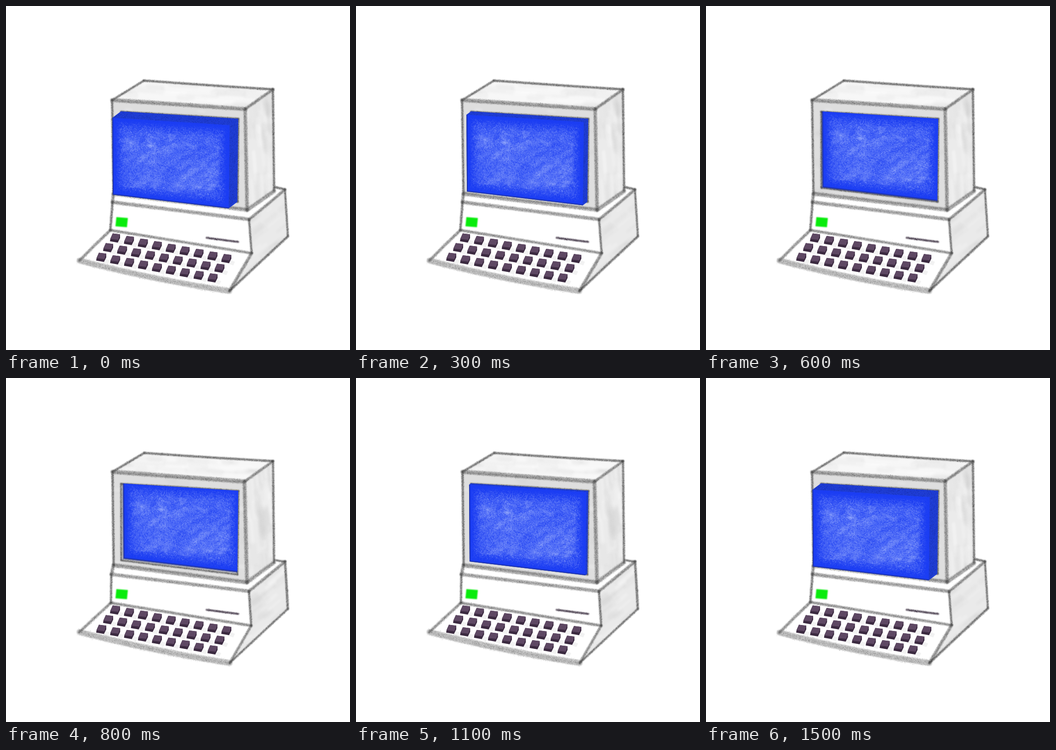
An HTML page with a canvas for the animation above (1.6 s loop, 748 px wide and 748 px high).

```html
<!DOCTYPE html>
<html lang="en">
<head>
<meta charset="utf-8">
<title>Crayon computer</title>
<style>
  html, body { margin: 0; width: 100%; height: 100%; overflow: hidden; background: #fff; }
  canvas { display: block; }
</style>
</head>
<body>
<canvas id="stage" width="748" height="748"></canvas>
<script>
const SIZE = 748, STEP = 100, STEPS = 16, POSES = 3;
const BLUE = '#1b3df3', SIDE_BLUE = '#1d3bd2';
const stage = document.getElementById('stage').getContext('2d');

// Corners: monitor a-g, base h-p, screen opening q-t
const CORNERS = {
  a: [300, 163], b: [580, 181], c: [230, 204], d: [520, 224],
  e: [234, 408], f: [523, 444], g: [582, 402],
  h: [230, 427], i: [528, 465], j: [607, 398], k: [612, 502], p: [585, 395],
  l: [227, 488], m: [533, 538], n: [160, 554], o: [486, 620],
  q: [250, 229], r: [505, 245], s: [503, 426], t: [251, 396]
};
const corners = (names, from = CORNERS) => [...names].map(name => from[name]);
const OPENING = corners('qrst');

let seed = 7;
const random = () => (seed = seed * 16807 % 2147483647) / 2147483647;
const spread = () => random() + random() - 1;

function layer() {
  const c = document.createElement('canvas');
  c.width = c.height = SIZE;
  return c.getContext('2d');
}

function trace(g, points) {
  g.beginPath();
  points.forEach(([x, y]) => g.lineTo(x, y));
  g.closePath();
}

function fill(g, points, color) {
  trace(g, points);
  g.fillStyle = color;
  g.fill();
}

// Grainy stroke, sagging by `bow` pixels in the middle
function pencil(g, a, b, width, dark, bow = 0, color = '65,65,65') {
  const m = [(a[0] + b[0]) / 2, (a[1] + b[1]) / 2 + bow * 2];
  g.save();
  g.filter = 'blur(1px)';
  g.lineCap = 'round';
  g.lineWidth = width;
  g.strokeStyle = `rgba(${color},${dark * 0.7})`;
  g.beginPath();
  g.moveTo(...a);
  g.quadraticCurveTo(...m, ...b);
  g.stroke();
  g.restore();
  const dots = Math.hypot(b[0] - a[0], b[1] - a[1]) * width * 0.55;
  g.fillStyle = `rgba(${color},${dark * 0.35})`;
  for (let i = 0; i < dots; i++) {
    const t = random(), u = 1 - t;
    const at = k => u * u * a[k] + 2 * u * t * m[k] + t * t * b[k] + spread() * width * 0.75;
    g.fillRect(at(0) - 0.5, at(1) - 0.5, 1.2, 1.2);
  }
}

// Soft random strokes inside a polygon, within the middle `part` of its height
function scribble(g, shape, color, count, width, [dx, dy], [from, to] = [0, 1]) {
  const xs = shape.map(p => p[0]), ys = shape.map(p => p[1]);
  const left = Math.min(...xs), top = Math.min(...ys);
  const w = Math.max(...xs) - left, h = Math.max(...ys) - top;
  g.save();
  trace(g, shape);
  g.clip();
  g.filter = 'blur(2px)';
  g.strokeStyle = color;
  g.lineCap = 'round';
  for (let i = 0; i < count; i++) {
    const x = left + random() * w, y = top + h * (from + random() * (to - from));
    const k = (0.3 + random()) / 2;
    g.lineWidth = width * (0.5 + random());
    g.beginPath();
    g.moveTo(x - dx * k, y - dy * k);
    g.lineTo(x + dx * k, y + dy * k);
    g.stroke();
  }
  g.restore();
}

function drawKey(g, x, y) {
  const at = points => points.map(([px, py]) => [x + px, y + py]);
  fill(g, at([[9, 4], [19, 8], [15, 16], [2, 11]]), 'rgba(0,0,0,.05)');
  fill(g, at([[-5, -9], [11, -7], [11, 1], [6, 11], [-11, 8], [-10, 2]]), '#3b2a40');
  fill(g, at([[-5, -9], [11, -7], [7, 5], [-10, 3]]), '#5e4863');
}

function drawComputer() {
  const g = layer();
  const shaky = {};
  for (const name in CORNERS) shaky[name] = CORNERS[name].map(v => v + spread() * 1.8);

  const shade = (names, color, direction) => {
    const face = corners(names, shaky);
    fill(g, face, color);
    scribble(g, face, 'rgba(190,190,190,.1)', 35, 10, direction);
    scribble(g, face, 'rgba(255,255,255,.2)', 20, 7, direction);
  };
  const sketch = (edges, width, dark, bow = 0) => {
    for (const edge of edges.split(' '))
      pencil(g, ...corners(edge, shaky), width * (1 + spread() * 0.15), dark, bow + spread());
  };

  shade('acdb', '#f7f7f7', [60, 4]);
  shade('dbgf', '#ebebeb', [4, 50]);
  shade('cdfe', '#dedede', [30, 2]);
  shade('ijkom', '#eaeaea', [30, -25]);
  sketch('ab ac bg ce pj jk ko im hl', 4.5, 0.8);
  sketch('db nl lm ij mo eh', 6, 0.62);
  sketch('cd df ef fg hi', 8, 0.55);
  sketch('no', 12, 0.42, 4);
  sketch('qr rs st tq', 4, 0.8);

  pencil(g, [436, 504], [505, 513], 4, 1, 0, '45,32,50');
  g.filter = 'blur(0.5px)';
  for (let row = 0; row < 3; row++)
    for (let col = 0; col < 9; col++)
      drawKey(g, 237 + 30.25 * col - 15 * row, 503.5 + 5.6 * col + 21 * row);
  return g.canvas;
}

function speckle(g, colors, count) {
  for (let i = 0; i < count; i++) {
    g.fillStyle = colors[i % colors.length];
    g.fillRect(225 + random() * 285, 225 + random() * 220, 1.2, 1.2);
  }
}

function drawScreenFace() {
  const g = layer();
  const inset = OPENING.map(([x, y]) => [377 + (x - 377) * 0.84, 324 + (y - 324) * 0.76]);
  fill(g, OPENING, BLUE);
  trace(g, OPENING);
  g.clip();
  g.filter = 'blur(9px)';
  fill(g, inset, 'rgba(125,150,252,.42)');
  g.filter = 'none';
  scribble(g, inset, 'rgba(165,185,255,.16)', 70, 9, [26, -16], [0.25, 0.85]);
  scribble(g, inset, 'rgba(190,205,255,.3)', 22, 6, [12, 5], [0.05, 0.3]);
  scribble(g, inset, 'rgba(190,205,255,.3)', 22, 5, [14, 3], [0.75, 1]);
  scribble(g, inset, 'rgba(27,61,243,.3)', 35, 6, [16, -6]);
  speckle(g, ['rgba(27,58,240,.4)', 'rgba(185,200,255,.26)'], 42000);
  g.filter = 'blur(4px)';
  g.strokeStyle = BLUE;
  g.lineWidth = 20;
  trace(g, OPENING);
  g.stroke();
  return g.canvas;
}

function drawScreenSides() {
  const g = layer();
  g.fillStyle = SIDE_BLUE;
  g.fillRect(0, 0, SIZE, SIZE);
  speckle(g, ['rgba(20,35,120,.3)', 'rgba(70,100,240,.25)'], 12000);
  return g.canvas;
}

const computers = Array.from({ length: POSES }, drawComputer);
const face = drawScreenFace();
const sides = drawScreenSides();

// Negative depth slides the screen out of its frame, positive pushes it in
function drawScreen(depth) {
  const dy = -0.75 * depth;
  const [topLeft, topRight, bottomRight] = OPENING;
  const [frontTopLeft, , frontBottomRight, frontBottomLeft] = OPENING.map(([x, y]) => [x + depth, y + dy]);
  const slab = [topLeft, topRight, bottomRight, frontBottomRight, frontBottomLeft, frontTopLeft];
  stage.save();
  trace(stage, depth > 0 ? OPENING : slab);
  stage.clip();
  if (depth < 0) stage.drawImage(sides, 0, 0);
  stage.drawImage(face, depth, dy);
  stage.strokeStyle = 'rgba(30,40,110,.5)';
  stage.lineWidth = 4;
  stage.beginPath();
  stage.moveTo(...frontTopLeft);
  stage.lineTo(...frontBottomLeft);
  stage.lineTo(...frontBottomRight);
  stage.stroke();
  stage.restore();
}

function drawLight(glow) {
  stage.save();
  stage.filter = `blur(${0.8 + glow}px)`;
  stage.globalAlpha = glow;
  fill(stage, [[240, 457], [263, 457], [271, 475], [267, 483], [240, 479], [237, 468]], '#c8fa50');
  stage.globalAlpha = 1;
  const inset = glow * 2.5;
  fill(stage, [[240 + inset, 459 + inset], [265 - inset, 461 + inset],
    [263 - inset, 481 - inset], [238 + inset, 479 - inset]], '#08ec0c');
  stage.restore();
}

function render(time) {
  const step = Math.floor(time / STEP) % STEPS;
  const angle = step / STEPS * 2 * Math.PI + 0.15;
  stage.fillStyle = '#fff';
  stage.fillRect(0, 0, SIZE, SIZE);
  stage.drawImage(computers[step % POSES], 0, 0);
  drawScreen(-7 - 12 * Math.cos(angle));
  drawLight(Math.max(0, 1 - Math.abs(step - 13) / 2));
}

const start = performance.now();
function loop() {
  render(performance.now() - start);
  requestAnimationFrame(loop);
}
loop();
</script>
</body>
</html>
```
